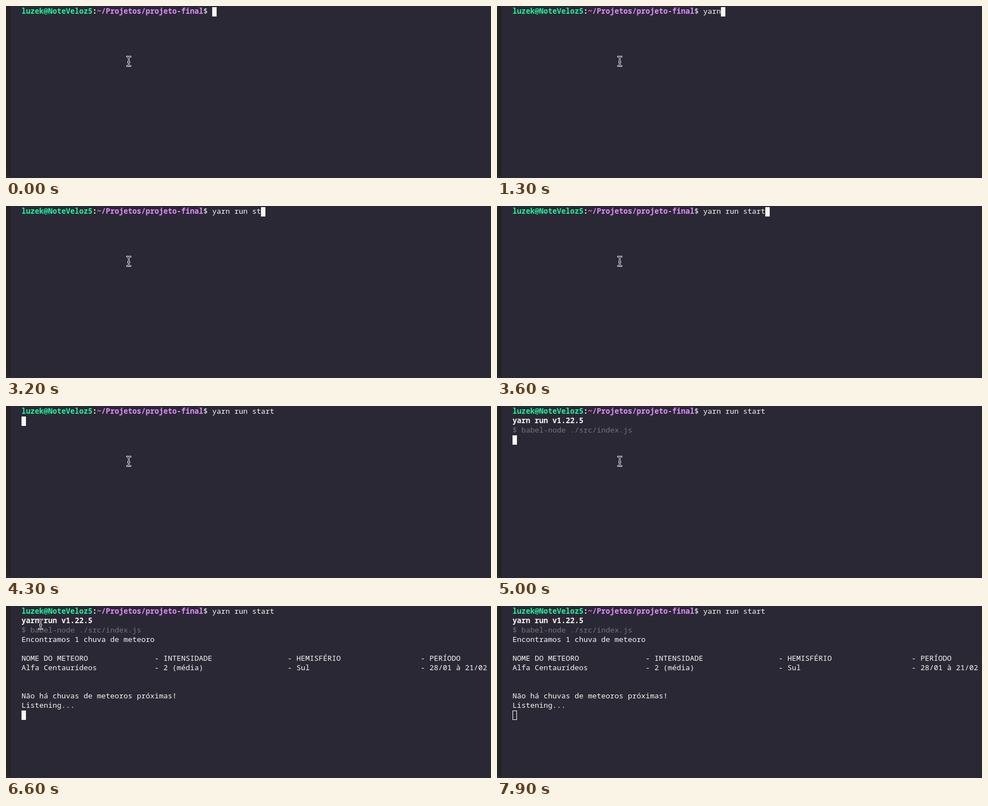
These frames come from a looping animation (875 px wide and 311 px high, 8 s). An HTML page with a canvas:

```html
<!DOCTYPE html>
<html lang="pt-BR">
<head>
<meta charset="utf-8">
<title>Terminal</title>
<style>
html, body { margin: 0; width: 100%; height: 100%; overflow: hidden; background: #2b2836; }
canvas { display: block; }
</style>
</head>
<body>
<canvas id="stage" width="875" height="311"></canvas>
<script>
const ctx = document.getElementById('stage').getContext('2d');
const LOOP = 8000, TICK = 100, BLUR = 7900;
const LEFT = 28, TOP = 2, CELL = 8, LINE = 17, BASELINE = 12;
const BG = '#2b2836', WHITE = '#f8f8f2', GREEN = '#20f79b', PURPLE = '#e68cff', GREY = '#75737b';
const FONT = '13.333px "Noto Sans Mono", "DejaVu Sans Mono", monospace';

const columns = (...cells) => cells.map(cell => cell.padEnd(30)).join('').trimEnd() + '\n';

// Everything the terminal prints, in order; the cursor follows the last character.
const STREAM = [
  { at: 0, text: 'luzek@NoteVeloz5', color: GREEN, bold: true },
  { at: 0, text: ':', bold: true },
  { at: 0, text: '~/Projetos/projeto-final', color: PURPLE, bold: true },
  { at: 0, text: '$ ' },
  { at: 300, text: 'y' },
  { at: 900, text: 'ar' },
  { at: 1300, text: 'n' },
  { at: 1500, text: ' ' },
  { at: 2300, text: 'ru' },
  { at: 2700, text: 'n ' },
  { at: 2900, text: 's' },
  { at: 3200, text: 'ta', pace: TICK },
  { at: 3500, text: 'rt', pace: TICK },
  { at: 4300, text: '\n' },
  { at: 4800, text: 'yarn run v1.22.5\n', bold: true },
  { at: 5000, text: '$ babel-node ./src/index.js\n', color: GREY },
  { at: 6100, text: 'Encontramos 1 chuva de meteoro\n\n' },
  { at: 6100, text: columns('NOME DO METEORO', '- INTENSIDADE', '- HEMISFÉRIO', '- PERÍODO') },
  { at: 6200, text: columns('Alfa Centaurídeos', '- 2 (média)', '- Sul', '- 28/01 à 21/02') },
  { at: 6200, text: '\n\nNão há chuvas de meteoros próximas!\nListening...\n' }
];

// The pointer glides through these points, then leaves.
const PATH = [
  { at: 6100, x: 221, y: 100 },
  { at: 6600, x: 62, y: 33 },
  { at: 6800, x: 41, y: 12 }
];

function drawWindow() {
  ctx.fillStyle = BG;
  ctx.fillRect(0, 0, 875, 311);
  ctx.fillStyle = '#242424';
  ctx.fillRect(0, 0, 7, 305);
  ctx.fillStyle = '#1f1d26';
  ctx.fillRect(7, 0, 1, 311);
  ctx.fillRect(0, 305, 7, 1);
}

function drawTerminal(t) {
  let x = LEFT, y = TOP;
  for (const { at, text, color = WHITE, bold, pace = 0 } of STREAM) {
    ctx.font = (bold ? 'bold ' : '') + FONT;
    ctx.fillStyle = color;
    [...text].forEach((ch, i) => {
      if (t < at + i * pace) return;
      if (ch === '\n') {
        x = LEFT;
        y += LINE;
      } else {
        ctx.fillText(ch, x, y + BASELINE);
        x += CELL;
      }
    });
  }
  drawCursor(x, y, t >= BLUR);
}

function drawCursor(x, y, hollow) {
  ctx.fillStyle = WHITE;
  ctx.fillRect(x, y, CELL, LINE);
  if (hollow) {
    ctx.fillStyle = BG;
    ctx.fillRect(x + 1, y + 1, CELL - 2, LINE - 2);
  }
}

function pointerAt(t) {
  const next = PATH.findIndex(p => p.at >= t);
  if (next < 0) return null;
  if (next === 0) return PATH[0];
  const a = PATH[next - 1], b = PATH[next];
  const k = (t - a.at) / (b.at - a.at);
  return { x: Math.round(a.x + (b.x - a.x) * k), y: Math.round(a.y + (b.y - a.y) * k) };
}

const BEAM = new Path2D('M-2.5 -8.5H-1L0.5 -7.5L2 -8.5H3.5 M0.5 -7.5V7.5' +
  ' M-2.5 8.5H-1L0.5 7.5L2 8.5H3.5 M-0.5 1.5H1.5');

function drawPointer({ x, y }) {
  ctx.save();
  ctx.translate(x, y);
  ctx.lineCap = 'square';
  for (const [color, width] of [['#d6d5d8', 3], ['#1b1a20', 1]]) {
    ctx.strokeStyle = color;
    ctx.lineWidth = width;
    ctx.stroke(BEAM);
  }
  ctx.restore();
}

function render(t) {
  drawWindow();
  drawTerminal(t);
  const pointer = pointerAt(t);
  if (pointer) drawPointer(pointer);
}

const start = performance.now();
function tick() {
  const t = (performance.now() - start) % LOOP;
  render(Math.floor(t / TICK) * TICK);
  requestAnimationFrame(tick);
}
tick();
</script>
</body>
</html>
```
